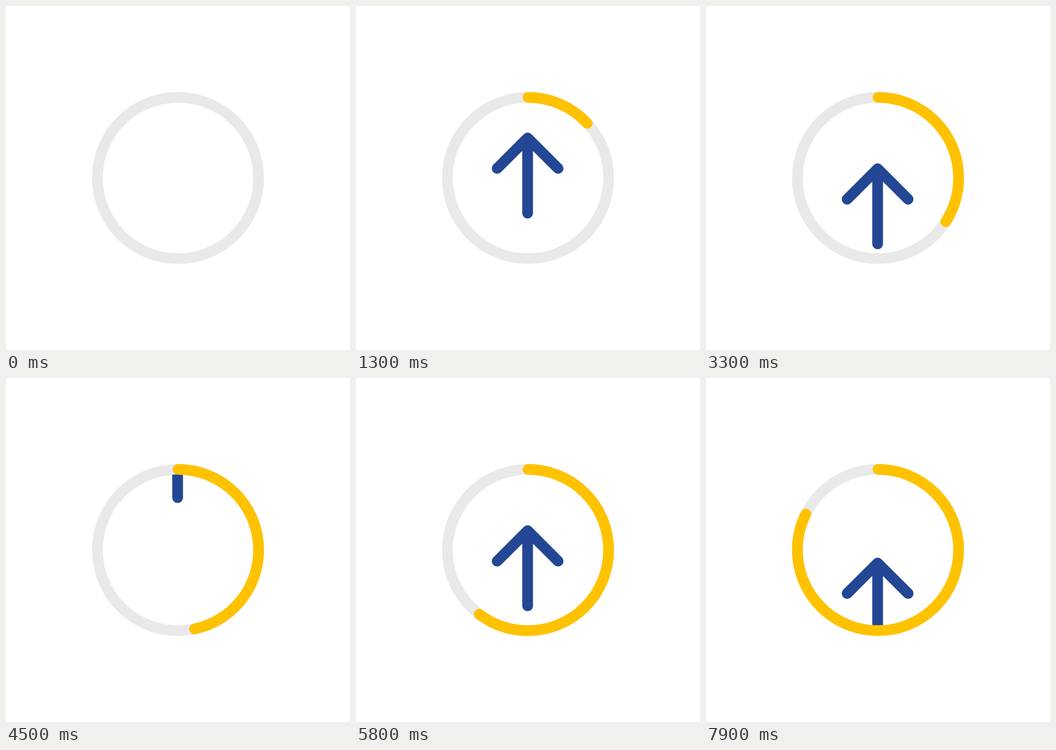
Animation of 640 by 640 pixels, one loop 8 s. Source, as an HTML page:

```html
<!DOCTYPE html>
<html lang="en">
<head>
<meta charset="utf-8">
<title>Upload progress</title>
<style>
  html, body { margin: 0; width: 100%; height: 100%; overflow: hidden; background: #fff; }
  svg { display: block; width: 100vw; height: 100vh; }
  g, circle { fill: none; stroke-width: 20; stroke-linecap: round; stroke-linejoin: round; }
</style>
</head>
<body>
<svg viewBox="0 0 640 640">
  <clipPath id="disc"><circle cx="320" cy="320" r="140.7"/></clipPath>
  <circle cx="320" cy="320" r="150" stroke="#e9e9e9"/>
  <g clip-path="url(#disc)" stroke="#234795">
    <path id="arrow" d="M-56.7 66.9 L0 10.2 L56.7 66.9 M0 10.2 V150"/>
  </g>
  <circle id="bar" cx="320" cy="320" r="150" stroke="#ffc200" pathLength="360" transform="rotate(-90 320 320)"/>
</svg>
<script>
  const LOOP = 8000;
  const RISE_SPEED = 440 / 2400;            // px per ms
  const BAR_SPEED = 0.03777;                // degrees per ms
  const BAR_DELAY = 50;
  const launches = [73, 2385, 4783, 7211];  // arrow enters at the bottom of the disc
  const arrow = document.getElementById('arrow');
  const bar = document.getElementById('bar');

  function draw(t) {
    const start = launches.findLast(s => s <= t) ?? t;
    const tip = 460.5 - (t - start) * RISE_SPEED;
    arrow.setAttribute('transform', `translate(319.3 ${tip})`);

    const angle = (t - BAR_DELAY) * BAR_SPEED;
    bar.style.display = angle > 0 ? '' : 'none';
    bar.setAttribute('stroke-dasharray', `${Math.max(angle, 0)} 400`);
  }

  const begin = performance.now();
  function tick() {
    draw((performance.now() - begin) % LOOP);
    requestAnimationFrame(tick);
  }
  draw(0);
  requestAnimationFrame(tick);
</script>
</body>
</html>
```
